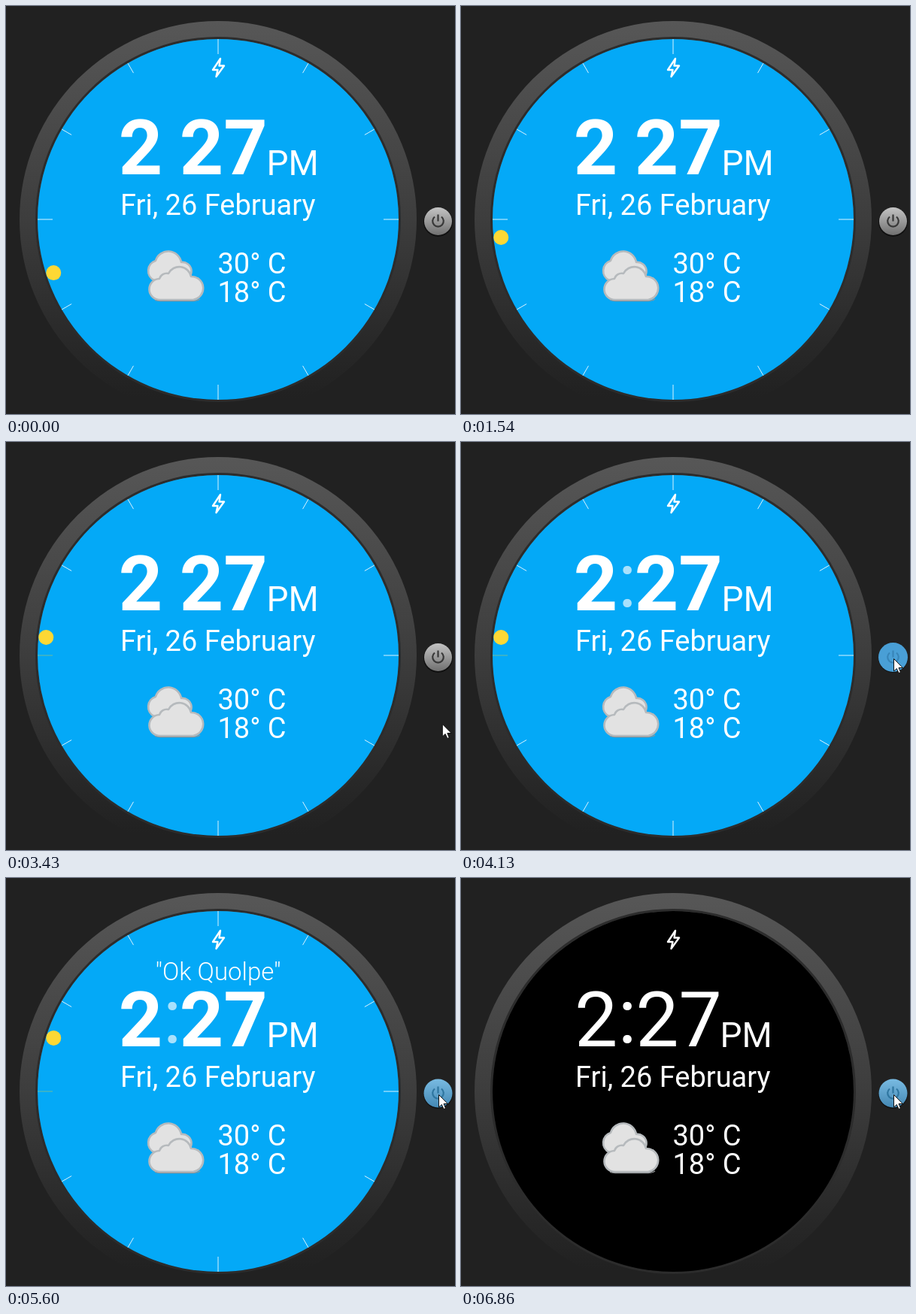
An HTML page that plays this animation: 597x543 px, repeating every 8000 ms.

```html
<!DOCTYPE html>
<html lang="en">
<head>
<meta charset="utf-8">
<title>Watch face</title>
<style>
  html, body { margin: 0; width: 100%; height: 100%; overflow: hidden; background: #212121; }
  svg { display: block; width: 597px; height: 543px; }
  text { font-family: Roboto, sans-serif; fill: #fff; white-space: pre; }
  .digits { font-size: 102px; }
  .line { font-size: 38px; }
  .cloud { fill: #e2e2e2; stroke: #b6babd; stroke-width: 2.6; stroke-linejoin: round; }
</style>
</head>
<body>
<svg viewBox="0 0 597 543">
  <defs>
    <linearGradient id="bezel" x2="0" y2="1">
      <stop offset="0" stop-color="#575757"/>
      <stop offset=".5" stop-color="#3d3d3d"/>
      <stop offset=".8" stop-color="#292929"/>
      <stop offset=".95" stop-color="#212121"/>
    </linearGradient>
    <linearGradient id="normal" x2="0" y2="1">
      <stop offset="0" stop-color="#c4c4c4"/>
      <stop offset="1" stop-color="#707070"/>
    </linearGradient>
    <linearGradient id="hover" x2="0" y2="1">
      <stop offset="0" stop-color="#79bbe2"/>
      <stop offset="1" stop-color="#4488b4"/>
    </linearGradient>
    <filter id="soft"><feGaussianBlur stdDeviation=".5"/></filter>
  </defs>

  <circle cx="282" cy="284" r="264" fill="url(#bezel)"/>
  <circle cx="282" cy="284" r="241.5" fill="none" stroke="#2c2c2c" stroke-width="3"/>
  <circle id="face" cx="282" cy="284" r="240"/>

  <path d="M285 70L275 85H281.500L279.500 94L290 79.500H283.500Z" fill="none" stroke="#fff"
        stroke-width="2.4" stroke-linejoin="round" filter="url(#soft)"/>

  <g id="active">
    <g id="ticks" stroke="#fff" stroke-opacity=".85"></g>
    <text id="hint" x="282" y="136" font-size="33" font-weight="300" text-anchor="middle">"Ok Quolpe"</text>
    <circle id="second" r="10" fill="#fdd835"/>
  </g>

  <g id="time">
    <text class="digits" id="hours" y="224">2</text>
    <text class="digits" id="minutes" y="224">27</text>
    <text id="half" y="224.500" font-size="46">PM</text>
  </g>
  <text class="digits" id="colon" x="221" y="219" text-anchor="middle">:</text>
  <text class="line" x="152" y="277.500">Fri, 26 February</text>
  <text class="line" x="281.500" y="355.500">30° C</text>
  <text class="line" x="281.500" y="394">18° C</text>

  <path class="cloud" d="M197 365A14 14 0 0 1 199 339A17.500 17.500 0 0 1 233 341A12 12 0 0 1 236 365Z"/>
  <path id="front" class="cloud" d="M205 391A14 14 0 0 1 204 363A10 10 0 0 1 216 356A16 16 0 0 1 246 360A15.600 15.600 0 0 1 249 391Z"/>
  <path d="M198 391.500Q201 392.600 205 392.600H249Q254 392.600 258 390" fill="none" stroke="#919497" stroke-width="1.200"/>

  <circle cx="574.500" cy="287.500" r="19.500" fill="#101010"/>
  <circle id="button" cx="574.500" cy="286.500"/>
  <path id="power" d="M570 280.500A7.300 7.300 0 1 0 579 280.500M574.500 277.500V286.500" fill="none" stroke-width="2.200"/>

  <path id="cursor" d="M0 0V16.500L3.800 13L6.500 19L9 18L6.500 12H11.800Z" fill="#fff" stroke="#111" stroke-width="1"/>
</svg>

<script>
const LOOP = 8000, FRAME = 70, AMBIENT = 6860;
const SECONDS = [630, 1540, 2450, 3360, 4340, 5180, 6090];
const COLON_ON = [210, 1050, 1960, 2870, 3780, 4690, 5600, 6510];
const PRESSES = [[4130, 4340], [6300, 6510]];
const CURSOR = { start: 3290, end: 3990, over: 3640 };
const BUTTON = {
  normal:  { fill: 'url(#normal)', r: 18.5, icon: '#383838' },
  hover:   { fill: 'url(#hover)',  r: 19,   icon: '#2f76a0' },
  pressed: { fill: '#499fd6',      r: 19.5, icon: '#3885b8' }
};

const $ = id => document.getElementById(id);
const set = (id, attrs) => {
  for (const name in attrs) $(id).setAttribute(name, attrs[name]);
};
const passed = (times, t) => times.filter(x => x <= t).length;
const clamp = x => Math.min(1, Math.max(0, x));
const show = on => on ? 'visible' : 'hidden';

function polar(degrees, radius) {
  const a = degrees * Math.PI / 180;
  return [282 + radius * Math.sin(a), 284 - radius * Math.cos(a)];
}

for (let degrees = 0; degrees < 360; degrees += 30) {
  const [x1, y1] = polar(degrees, degrees % 90 ? 225 : 220);
  const [x2, y2] = polar(degrees, 240);
  $('ticks').insertAdjacentHTML('beforeend',
    `<line id="tick${degrees}" x1="${x1}" y1="${y1}" x2="${x2}" y2="${y2}"/>`);
}

function drawFace(t) {
  const ambient = t >= AMBIENT;
  const elapsed = passed(SECONDS, t);
  const [cx, cy] = polar((42 + elapsed) * 6, 230);
  const colonOn = ambient || passed(COLON_ON, t) > elapsed;
  const weight = ambient ? 400 : 700;

  set('face', { fill: ambient ? '#000' : '#04a9f7' });
  set('active', { visibility: show(!ambient) });
  set('second', { cx, cy });
  set('tick270', { stroke: elapsed > 3 ? '#82bd8c' : '#fff' });
  set('hint', { opacity: clamp((t - 4270) / 420) });
  set('hours', { x: ambient ? 151 : 149.7, 'font-weight': weight });
  set('minutes', { x: ambient ? 232.3 : 230.7, 'font-weight': weight });
  set('half', { x: ambient ? 344.5 : 346.5 });
  set('colon', { visibility: show(colonOn), opacity: ambient ? 1 : 0.66 });
}

function drawPointer(t) {
  const p = clamp((t - CURSOR.start) / (CURSOR.end - CURSOR.start));
  const x = 580 - 5 * p * p;
  const y = 288 + 200 * (1 - p) ** 3.73;
  set('cursor', { transform: `translate(${x + 0.5} ${y + 0.5})`, visibility: show(t >= CURSOR.start) });

  const pressed = PRESSES.some(([down, up]) => t >= down && t < up);
  const look = BUTTON[pressed ? 'pressed' : t >= CURSOR.over ? 'hover' : 'normal'];
  set('button', { fill: look.fill, r: look.r });
  set('power', { stroke: look.icon });
}

const startTime = performance.now();
function tick() {
  const t = (performance.now() - startTime) % LOOP;
  const step = Math.floor(t / FRAME) * FRAME;
  drawFace(step);
  drawPointer(step);
  requestAnimationFrame(tick);
}
tick();
</script>
</body>
</html>
```
